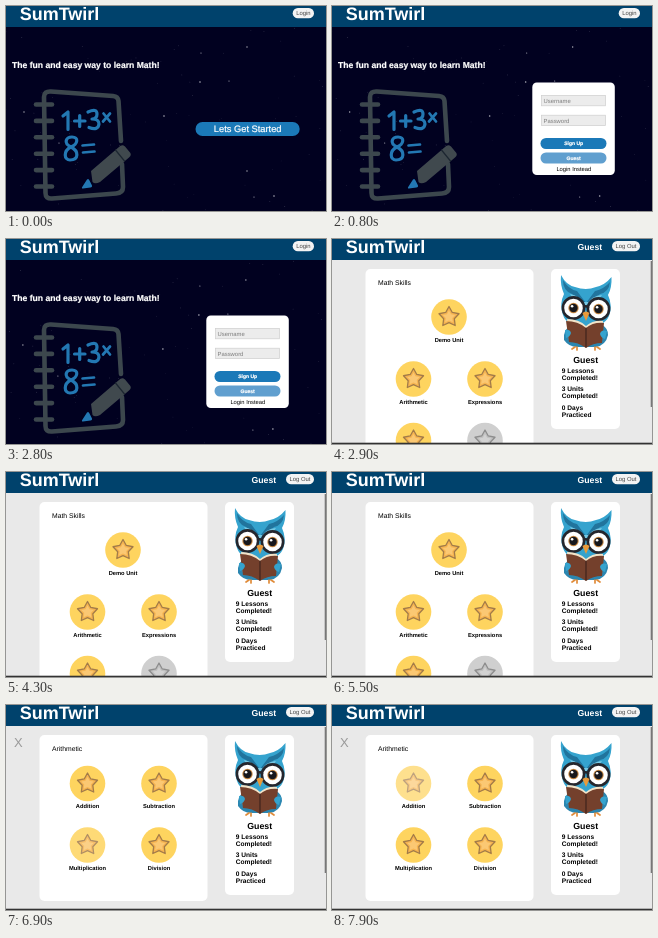
An HTML page that plays this animation: 320 px wide and 205 px high, repeating every 8 s.

```html
<!DOCTYPE html>
<html lang="en">
<head>
<meta charset="utf-8">
<title>SumTwirl</title>
<style>
  html, body { margin: 0; width: 100%; height: 100%; overflow: hidden; background: #010120; }
  svg { display: block; width: 100vw; height: 100vh; }
  text { font-family: "Liberation Sans", Arial, Helvetica, sans-serif; text-rendering: geometricPrecision; }
  .b { font-weight: bold; }
  .mid { text-anchor: middle; }
  .white { fill: #fff; }
  .heavy { stroke: #fff; stroke-width: .22; }
  .line { fill: none; stroke-linecap: round; stroke-linejoin: round; }
</style>
</head>
<body>
<svg viewBox="0 0 320 205" preserveAspectRatio="none">
  <defs>
    <g id="badge">
      <circle r="17.8" fill="#fed45f"/>
      <path class="star line" style="fill:#f6b450" stroke="#a37b49" stroke-width="1.3"/>
      <path class="star" transform="scale(.62)" fill="#fbc873"/>
    </g>
    <g id="locked">
      <circle r="17.8" fill="#cfcfcf"/>
      <path class="star line" style="fill:#c0c0c0" stroke="#8d8d8d" stroke-width="1.3"/>
      <path class="star" transform="scale(.62)" fill="#d2d2d2"/>
    </g>
    <g id="lens">
      <circle r="10.6" fill="#fff" stroke="#25262d" stroke-width="2.6"/>
      <circle r="5.2" fill="#c98a45"/>
      <circle r="4.2" fill="#17171c"/>
      <circle cx="-1.4" cy="-1.7" r="1.3" fill="#fff"/>
    </g>
  </defs>

  <g id="landing">
    <rect width="320" height="205" fill="#010120"/>
    <g id="sky" fill="#fff"></g>
    <text class="b white heavy" x="6" y="62" font-size="8.6">The fun and easy way to learn Math!</text>

    <g class="line" stroke="#3c474d" stroke-width="4.6">
      <path d="M115 135L112.500 95Q112 90.500 107 90L45 85.500Q38 85 38 91L39.500 187Q39.500 193 46 192.500L110 187.500Q117 187 117 181L116 158"/>
      <g id="rings"></g>
    </g>
    <g class="line" stroke="#2378b3" stroke-width="3.2">
      <path d="M57 110L62 106V123.500M68.500 115H79M73.700 109.500V120.500"/>
      <path d="M82 106Q91 102 91 108Q91 113 86 113Q93 113 93 118Q92 125 83 121.500"/>
      <path d="M97.500 107.500L104 115.500M104 107.500L97 115.500" stroke-width="2.700"/>
      <path d="M65 141C57 137 60 131 66 131C73 131 72 138 65 141C57 145 58 154 64 154C73 154 73 145 65 141Z"/>
      <path d="M76.500 139.500L88 138.500M77 146.500L88.500 145.500" stroke-width="2.700"/>
    </g>
    <path d="M85 165L113 141Q116 138 119 140.500L124 146.500Q126 149 123 151.500L94 176Q89 178.500 86.500 176Z" fill="#40494e"/>
    <path class="line" d="M109.500 144L118.500 155" stroke="#1c2631" stroke-width="1.200"/>
    <path d="M81 173.500Q82.500 172 83.500 174.500L86 179.500Q86.500 181.500 84.500 181.500L77 182.500Q75 182.500 76.500 180.500Z" fill="#2378b3"/>

    <g id="start">
      <rect x="189.500" y="116" width="104.200" height="14" rx="7" fill="#1b79b8"/>
      <text class="white heavy mid" x="241.700" y="126.300" font-size="9.300">Lets Get Started</text>
    </g>
    <g id="form">
      <rect x="200.300" y="76.500" width="82.500" height="92.500" rx="4.500" fill="#fff"/>
      <g fill="#ececec" stroke="#cfcfcf" stroke-width=".7">
        <rect x="209.400" y="89.400" width="64.200" height="10.400"/>
        <rect x="209.400" y="109.200" width="64.200" height="10.400"/>
      </g>
      <g font-size="5.900" fill="#7c7c7c">
        <text x="211.500" y="96.800">Username</text>
        <text x="211.500" y="116.600">Password</text>
      </g>
      <rect x="208.500" y="132" width="66" height="11" rx="5.500" fill="#1b79b8"/>
      <rect x="208.500" y="146.500" width="66" height="11" rx="5.500" fill="#609fcf"/>
      <g class="b white heavy mid" font-size="5">
        <text x="241.700" y="139.300">Sign Up</text>
        <text x="241.700" y="153.800">Guest</text>
      </g>
      <text class="mid" x="241.800" y="164.500" font-size="5.800">Login Instead</text>
    </g>
  </g>

  <g id="app">
    <rect width="320" height="205" fill="#e9e9e9"/>

    <g id="skills">
      <rect x="33.500" y="30" width="168" height="190" rx="5" fill="#fff"/>
      <text x="46" y="45.500" font-size="6.800">Math Skills</text>
    </g>
    <g id="welcome">
      <rect x="34" y="30" width="167" height="114" rx="5" fill="#fff"/>
    </g>
    <g id="lessons">
      <rect x="33.500" y="30" width="168" height="166" rx="5" fill="#fff"/>
      <text x="46" y="45.500" font-size="6.800">Arithmetic</text>
    </g>
    <text id="close" x="8" y="42" font-size="13" fill="#999">X</text>

    <rect x="219" y="30" width="69" height="160" rx="5" fill="#fff"/>
    <g id="owl">
      <path d="M238 88Q231 90 232 101Q237 108 245 108H264Q274 106 276 96Q276 89 270 86Z" fill="#2b86b0"/>
      <path d="M229 36Q234 46 243 48Q254 52 264 48Q273 46 279.500 38Q280 49 276 56Q281 67 277 77Q272 88 254 89Q235 88 231 76Q227 65 232 55Q228 46 229 36Z" fill="#35a3ce"/>
      <path d="M231 41Q236 50 245 52L254 64L263 52Q272 50 278 43Q277 53 268 55L254 69L240 55Q231 52 231 41Z" fill="#21749d"/>
      <path d="M238 55Q247 56 254 67Q260 56 270 56L265 63H243Z" fill="#77c8e3"/>
      <use href="#lens" x="241.500" y="69"/>
      <use href="#lens" x="266.500" y="70"/>
      <path class="line" d="M252 68Q254 66 256 68.500" stroke="#25262d" stroke-width="2.400"/>
      <path d="M250.500 74Q254 71 257.500 74L254 82Z" fill="#e99a3a"/>
      <path d="M235 80Q247 80 254 87Q261 81 271 82L270 102Q261 102 254 107Q246 101 237 101Z" fill="#f2e3c8"/>
      <path d="M234 82Q246 82 254 89Q261 83 272 84L270 104Q261 104 254 109Q246 103 237 103Z" fill="#74402c"/>
      <path class="line" d="M254 89V108" stroke="#3f231d" stroke-width="1.200"/>
      <path d="M233 91Q238 90 239 94Q238 98 234 99ZM275 92Q269 90 268 95Q269 99 273 100Z" fill="#35a3ce"/>
      <path class="line" d="M243 108L240 110M245 108V111M263 108V111M265 108L268 110" stroke="#e08b38" stroke-width="1.700"/>
    </g>
    <text class="b mid" x="253.700" y="123.500" font-size="8.800">Guest</text>
    <g class="b" font-size="6.600">
      <text x="229.800" y="134">9 Lessons</text><text x="229.800" y="141">Completed!</text>
      <text x="229.800" y="152.300">3 Units</text><text x="229.800" y="159.300">Completed!</text>
      <text x="229.800" y="170.500">0 Days</text><text x="229.800" y="177.500">Practiced</text>
    </g>
    <rect x="318.700" y="22" width="1.300" height="146" fill="#777"/>
    <rect y="203.700" width="320" height="1.300" fill="#333"/>
  </g>

  <rect width="320" height="21" fill="#00426c"/>
  <text class="b white" x="13.700" y="14" font-size="18">SumTwirl</text>
  <g id="login">
    <rect x="286.700" y="2" width="21.300" height="10.300" rx="5.150" fill="#f3f3f3"/>
    <text class="mid" x="297.400" y="9.200" font-size="5.900" fill="#444">Login</text>
  </g>
  <g id="user">
    <text class="b white" x="245.500" y="10.500" font-size="8.700">Guest</text>
    <rect x="280" y="2" width="28" height="10.300" rx="5.150" fill="#f3f3f3"/>
    <text class="mid" x="294" y="9.200" font-size="5.900" fill="#444">Log Out</text>
  </g>
</svg>
<script>
  const LOOP = 8000;
  const FORM = 500, SKILLS = 2900, WELCOME = 6300, LESSONS = 6400;
  const $ = id => document.getElementById(id);

  function add(parent, tag, attrs, text = "") {
    const el = document.createElementNS("http://www.w3.org/2000/svg", tag);
    for (const key in attrs) el.setAttribute(key, attrs[key]);
    el.textContent = text;
    return parent.appendChild(el);
  }

  function starPath(points, outer, inner) {
    let d = "";
    for (let i = 0; i < points * 2; i++) {
      const a = Math.PI * (i / points - 0.5), r = i % 2 ? inner : outer;
      d += (i ? "L" : "M") + (r * Math.cos(a)).toFixed(2) + " " + (r * Math.sin(a)).toFixed(2);
    }
    return d + "Z";
  }
  document.querySelectorAll(".star").forEach(el => el.setAttribute("d", starPath(5, 10.5, 5.6)));

  // Night sky: a few bright stars over seeded faint ones
  let seed = 11;
  const rand = () => (seed = seed * 16807 % 2147483647) / 2147483647;
  for (let i = 0; i < 75; i++) {
    add($("sky"), "circle", { cx: rand() * 330, cy: 22 + rand() * 183, r: 0.4, opacity: 0.1 + rand() * 0.25 });
  }
  const bright = [[195, 47], [241, 41], [194, 76], [223, 75], [241, 165], [268, 190], [248, 191],
    [18, 106], [158, 110], [53, 137]];
  bright.forEach(([cx, cy], i) => add($("sky"), "circle", { cx, cy, r: 0.6 + i % 3 * 0.1, opacity: 0.7 }));

  for (let i = 0; i < 6; i++) add($("rings"), "path", { d: `M30 ${98.5 + i * 16.4}H46` });

  function unit(page, x, y, label, kind = "badge", labelY = y + 24.7) {
    const g = add($(page), "g", {});
    add(g, "use", { href: "#" + kind, x, y });
    add(g, "text", { x, y: labelY, class: "b mid", "font-size": 5.75 }, label);
    return g.firstChild;
  }
  unit("skills", 117, 78, "Demo Unit");
  const arithmetic = unit("skills", 81.5, 140, "Arithmetic");
  unit("skills", 153, 140, "Expressions");
  unit("skills", 81.5, 201.5, "");
  unit("skills", 153, 201.5, "", "locked");
  unit("welcome", 117, 79.5, "Welcome Lesson");
  const addition = unit("lessons", 81.5, 78.5, "Addition");
  unit("lessons", 153, 78.5, "Subtraction");
  const multiplication = unit("lessons", 81.5, 140, "Multiplication");
  unit("lessons", 153, 140, "Division");

  const show = (id, on) => { $(id).style.display = on ? "" : "none"; };
  const ease = (t, from, span) => {
    const p = Math.min(1, Math.max(0, (t - from) / span));
    return p * p * (3 - 2 * p);
  };
  const hover = (el, amount) => el.setAttribute("opacity", 1 - 0.3 * amount);

  function draw(t) {
    const inApp = t >= SKILLS;
    show("landing", !inApp);
    show("login", !inApp);
    show("app", inApp);
    show("user", inApp);
    show("start", t < FORM);
    show("form", t >= FORM);
    show("skills", t < WELCOME);
    show("welcome", t >= WELCOME && t < LESSONS);
    show("lessons", t >= LESSONS);
    show("close", t >= WELCOME);
    $("sky").setAttribute("transform", `translate(${-t / 2500} 0)`);
    hover(arithmetic, ease(t, 5700, 400));
    hover(multiplication, 1 - ease(t, 6800, 200));
    hover(addition, ease(t, 7300, 300));
  }

  const begin = performance.now();
  function tick() {
    draw((performance.now() - begin) % LOOP);
    requestAnimationFrame(tick);
  }
  tick();
</script>
</body>
</html>
```
